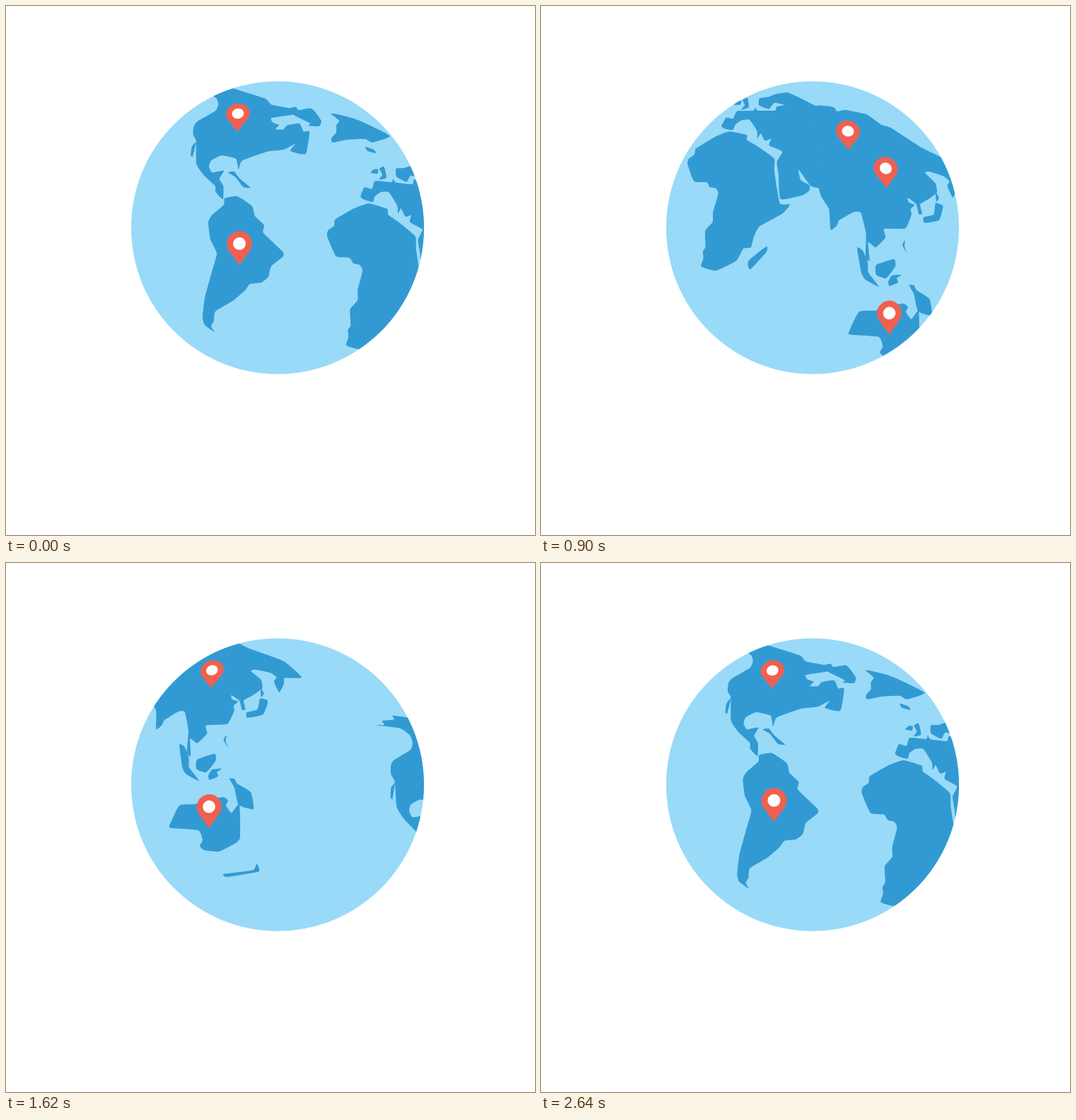
An HTML page with a canvas that plays this animation: 748x748 px, repeating every 2.67 s.

```html
<!DOCTYPE html>
<html>
<head>
<meta charset="utf-8">
<title>Turning globe</title>
<style>
html, body { margin: 0; width: 100%; height: 100%; overflow: hidden; background: #fff; }
canvas { display: block; }
</style>
</head>
<body>
<canvas id="stage" width="748" height="748"></canvas>
<script>
const ctx = document.getElementById('stage').getContext('2d');
const LOOP = 2670, STEP = 30, TURN = 2638;
const SHIFT = { x: 762, y: 333 };              // map travel in one turn
const BULGE = { x: 384, y: 400, r: 424 };      // spherical lens over the flat map
const GLOBE = { x: 384, y: 313.5, r: 207 };

// Flat map position -> stage position
function bulge(x, y) {
  const d = Math.hypot(x, y) || 1e-6, a = d / BULGE.r;
  const s = a < Math.PI / 2 ? Math.sin(a) : 1 + a - Math.PI / 2;
  const k = s * BULGE.r / d;
  return [BULGE.x + x * k, BULGE.y + y * k];
}

// Stage position seen at a time -> flat map position
function flatten(time, [px, py]) {
  const x = px - BULGE.x, y = py - BULGE.y, d = Math.hypot(x, y) || 1e-6;
  const k = Math.asin(Math.min(1, d / BULGE.r)) * BULGE.r / d, turn = time / TURN;
  return [x * k + SHIFT.x * turn, y * k + SHIFT.y * turn];
}

const land = [];
function coast(time, outline) {
  const points = outline.trim().split(/\s+/).map(p => p.split(',').map(Number));
  land.push(points.map(p => flatten(time, p)));
}

// North America
coast(2250, `351,157 363,156 360,151 378,148 376,143 406,145 425,154 471,172 481,182 507,189 513,198
  482,202 484,209 493,213 488,219 499,220 504,214 521,212 527,224 535,225 531,257 510,252 516,242
  500,250 478,252 443,264 438,277 434,261 413,255 398,262 395,271 400,280 417,278 411,290 417,301
  417,320 406,309 405,300 388,284 376,266 374,231 369,222 369,210 374,202 400,187 404,177 400,167
  386,159`);
// Baffin, Baja, Cuba
coast(2250, '506,189 515,187 519,192 535,190 541,195 550,209 548,217 533,216 535,212 514,200');
coast(2250, '367,253 368,240 374,233 370,255');
coast(2250, '423,281 432,280 440,290 456,304 446,303 434,288');
// South America
coast(0, `308,281 309,272 327,269 348,283 352,297 365,310 364,321 391,347 392,354 375,368 371,383
  361,391 345,393 338,402 322,416 296,432 294,445 290,453 295,461 281,451 278,441 281,413 291,376
  298,350 289,330 286,306 291,296`);
// Greenland, Iceland, Ireland, Britain
coast(0, `459,152 468,153 492,159 513,168 543,184 518,193 508,188 483,189 462,193 460,187 467,179
  467,169 471,162`);
coast(0, '508,199 520,203 523,208 511,205');
coast(390, '408,189 413,184 419,184 418,190');
coast(390, '421,183 428,180 431,195 420,198 425,191');
// Europe and Arabia
coast(390, `392,222 398,209 409,211 414,200 438,201 441,196 445,201 470,203 472,197 483,195 468,191
  461,200 446,193 446,182 458,181 470,177 486,176 508,188 526,199 554,207 557,300 549,337 538,322
  525,318 508,294 511,309 523,317 523,325 514,331 484,336 480,300 477,281 484,266 465,256 467,246
  458,248 444,221 452,234 447,244 446,233 434,215 422,215 413,221 410,229 397,226`);
// Africa and Madagascar
coast(390, `383,238 404,231 431,238 432,246 449,257 473,276 474,295 483,342 497,344 487,357 455,375
  447,390 443,405 432,407 422,424 392,438 370,432 373,420 372,410 376,403 375,380 386,367 386,353
  393,325 389,317 380,315 374,307 355,305 343,278 344,270 353,263 355,254`);
coast(390, '439,432 440,424 458,409 466,404 465,412 443,436');
// Asia
coast(1140, `326,121 355,125 366,123 396,128 416,141 430,145 472,170 522,193 548,219 525,219 525,227
  519,240 511,224 514,217 505,210 484,204 478,206 493,220 495,233 482,243 470,250 473,263 468,264
  464,250 452,241 453,247 462,251 456,257 457,265 448,284 417,285 419,297 405,311 394,304 396,330
  390,325 391,292 384,263 374,262 353,274 350,281 341,287 339,258 326,232`);
// Sakhalin, Japan
coast(1140, '493,232 498,241 494,246');
coast(1140, '475,268 490,264 493,248 504,252 498,272 476,276');
// Sumatra, Borneo, Sulawesi, Philippines
coast(900, '447,342 455,346 462,363 463,377 478,397 459,387 453,377');
coast(900, '474,366 499,358 501,368 488,385 474,380');
coast(900, '491,390 496,381 510,380 503,385 505,391 493,396');
coast(900, '511,338 515,331 514,340 518,350');
// New Guinea, Australia, New Zealand
coast(1620, '316,305 323,305 327,312 346,324 350,348 329,342 323,318');
coast(1620, `231,372 245,343 268,341 276,336 307,331 314,336 311,343 319,353 330,341 331,388 323,397
  301,408 280,406 274,400 278,392 272,378 235,375`);
coast(1620, '307,440 330,437 350,434 355,425 358,436 338,440 312,444');

const pins = [
  [2250, [433.5, 193]], [0, [330, 336]], [900, [434, 177]],
  [900, [487.5, 229.5]], [1140, [424.5, 404.5]]
].map(([time, p]) => flatten(time, p));

function arc(r, from, to) {
  return Array.from({ length: 41 }, (_, i) => {
    const a = (from + (to - from) * i / 40) * Math.PI / 180;
    return [r * Math.cos(a), r * Math.sin(a)];
  });
}
const pinBody = [...arc(18, 144, 396), [0, 30.5]];
const pinHole = arc(9, 0, 360);

// Closed outline through the warped points; soft rounds the corners
function fill(points, dx, dy, color, soft = 0) {
  const p = points.map(([x, y]) => bulge(x + dx, y + dy)), n = p.length;
  ctx.beginPath();
  ctx.moveTo(...p[0]);
  p.forEach((b, i) => {
    const a = p[(i + n - 1) % n], c = p[(i + 1) % n], d = p[(i + 2) % n];
    ctx.bezierCurveTo(
      b[0] + (c[0] - a[0]) * soft, b[1] + (c[1] - a[1]) * soft,
      c[0] - (d[0] - b[0]) * soft, c[1] - (d[1] - b[1]) * soft, ...c);
  });
  ctx.fillStyle = color;
  ctx.fill();
}

function draw(time) {
  ctx.fillStyle = '#fff';
  ctx.fillRect(0, 0, 748, 748);
  ctx.save();
  ctx.beginPath();
  ctx.arc(GLOBE.x, GLOBE.y, GLOBE.r, 0, 2 * Math.PI);
  ctx.fillStyle = '#99daf8';
  ctx.fill();
  ctx.clip();
  const offsets = [-1, 0, 1].map(n => n - time / TURN).map(k => [SHIFT.x * k, SHIFT.y * k]);
  for (const [dx, dy] of offsets) for (const shape of land) fill(shape, dx, dy, '#329ad3', 0.08);
  for (const [dx, dy] of offsets) for (const [x, y] of pins) {
    fill(pinBody, x + dx, y + dy, '#f1604f');
    fill(pinHole, x + dx, y + dy, '#fff');
  }
  ctx.restore();
}

function tick() {
  const time = performance.now() % LOOP;
  draw(Math.floor(time / STEP) * STEP);
  requestAnimationFrame(tick);
}
tick();
</script>
</body>
</html>
```
